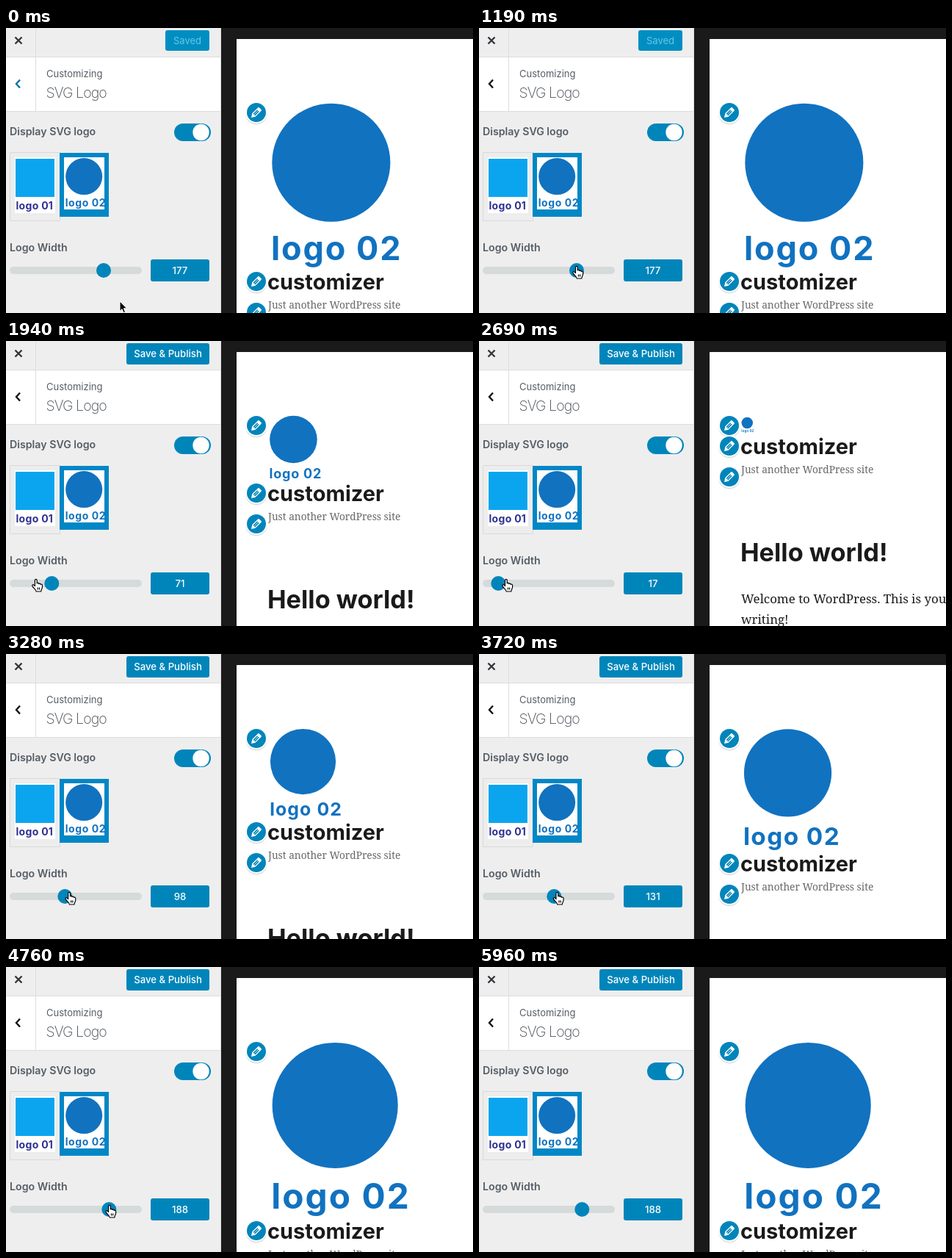
An HTML page for the animation above (7520 ms loop, 636 by 388 pixels).

```html
<!DOCTYPE html>
<html lang="en">
<head>
<meta charset="utf-8">
<title>Logo width customizer</title>
<style>
  html, body { margin: 0; height: 100%; overflow: hidden; background: #eee; }
  svg { display: block; width: 100vw; height: 100vh; font: 13px Inter, sans-serif; }
  .blue { fill: #0085ba; }
  .brand { fill: #1172c0; }
  .bold { font-weight: 700; }
  .label { font-size: 14.2px; font-weight: 600; fill: #555d66; }
  .button { font-size: 13.2px; font-weight: 500; fill: #fff; text-anchor: middle; }
  .serif { font-family: "Noto Serif", serif; }
  .line { fill: none; stroke-width: 2.4; }
</style>
</head>
<body>
<svg viewBox="0 0 636 388">
  <defs>
    <!-- Unit is one hundredth of the logo width -->
    <g id="logo" class="brand">
      <circle cx="48.5" cy="46.5" r="45.5"/>
      <text class="bold" x="2.2" y="121.5" font-size="25.4" letter-spacing="1.1">logo 02</text>
    </g>
    <g id="edit">
      <circle cy="1.5" r="15" fill="#2e4453" opacity=".18"/>
      <circle r="15" fill="#fff"/>
      <circle class="blue" r="13"/>
      <path transform="translate(-10 -10)" fill="#fff" d="M13.89 3.39l2.71 2.72c.46.46.42 1.24.03 1.64l-8.01 8.02-5.56 1.16 1.16-5.58s7.6-7.63 7.99-8.03c.39-.39 1.22-.39 1.68.07zm-2.73 2.79l-5.59 5.61 1.11 1.11 5.54-5.65zm-2.97 8.23l5.58-5.6-1.07-1.08-5.59 5.6z"/>
    </g>
  </defs>

  <!-- Preview -->
  <path fill="#1a1a1a" d="M293 0h343v388H293z"/>
  <path fill="#fff" d="M314 15h322v373H314z"/>
  <use id="pageLogo" href="#logo"/>
  <use href="#edit" x="341" y="115"/>
  <g id="content" fill="#1a1a1a">
    <text class="bold" x="356" y="10.5" font-size="29">customizer</text>
    <text class="serif" x="357" y="37" font-size="13.7" fill="#686868">Just another WordPress site</text>
    <text class="bold" x="356" y="157" font-size="34.3">Hello world!</text>
    <g class="serif" font-size="16.85">
      <text x="357" y="214">Welcome to WordPress. This is your first post.</text>
      <text x="357" y="242">writing!</text>
    </g>
    <use href="#edit" x="341"/>
    <use href="#edit" x="341" y="42"/>
  </g>

  <!-- Sidebar -->
  <path fill="#eee" d="M0 0h293v388H0z"/>
  <path fill="#fff" d="M0 40h292v73H0z"/>
  <path fill="none" stroke="#ddd" d="M0 39.5H292M0 113.5H292M40.5 0V113M292.5 0V388"/>
  <path class="line" stroke="#32373c" d="M12.5 12.5l9 9m0-9l-9 9"/>
  <path id="back" class="line" d="M19 70.5l-5 5.5 5 5.5"/>
  <g id="saved">
    <rect x="217" y="3" width="60" height="28" rx="3" fill="#008ec2"/>
    <text x="247" y="22" text-anchor="middle" fill="#66c6e4">Saved</text>
  </g>
  <g id="publish">
    <rect class="blue" x="164" y="3" width="113" height="29" rx="3"/>
    <text class="button" x="220.5" y="22">Save &amp; Publish</text>
  </g>
  <text x="55" y="67" fill="#555d66">Customizing</text>
  <text x="54.5" y="95" font-size="19.5" font-weight="200" letter-spacing="-.9" fill="#444b52">SVG Logo</text>
  <text class="label" x="5" y="146">Display SVG logo</text>
  <rect class="blue" x="229" y="130" width="50" height="24" rx="12"/>
  <circle cx="265.5" cy="142" r="11.2" fill="#fff"/>

  <path fill="#ededed" stroke="#d9d9d9" d="M5.5 169.5h68v93h-68z"/>
  <path fill="#fff" d="M12 176h55v76H12z"/>
  <path fill="#0ba5ef" d="M13 178h53v52H13z"/>
  <text class="bold" x="13.5" y="247" font-size="14" letter-spacing=".3" fill="#2e3192">logo 01</text>
  <path fill="#0087c6" d="M73 170h67v87H73z"/>
  <path fill="#fff" d="M79 176h55v71H79z"/>
  <use href="#logo" transform="translate(79.5 176.5) scale(.55)"/>

  <text class="label" x="5" y="304">Logo Width</text>
  <rect x="5" y="325" width="180" height="10" rx="5" fill="#d5dadb"/>
  <circle id="knob" class="blue" cy="330" r="10"/>
  <rect class="blue" x="197" y="315" width="80" height="30" rx="3"/>
  <text id="value" class="button" x="237" y="335"></text>

  <path id="arrow" stroke="#fff" d="M0 0v13.5l3-2.8 2.2 5 2.3-1-2.1-4.9h4.1z"/>
  <path id="hand" fill="#fff" stroke="#000" stroke-width="1.2" stroke-linejoin="round" d="M-.5 9V1.8a1.4 1.4 0 0 1 2.8 0V6c.4-1 2.4-.9 2.5.6.5-1 2.4-.6 2.4.8.7-.6 2.4-.2 2.4 1.4V11c0 2-1.6 3-1.8 6H1.2C1 14.5-2 13-4 9.6-4.8 8-3 7.2-2 8.2L-.5 9.7zM3.5 11.5v3m2.2-3v3"/>
</svg>
<script>
const LOOP = 7520;
const STEP = 149; // time between screen updates

const el = id => document.getElementById(id);
const show = (id, on) => el(id).setAttribute('visibility', on ? 'visible' : 'hidden');
const place = (id, x, y, scale = 1) => el(id).setAttribute('transform', `translate(${x} ${y}) scale(${scale})`);

// Smooth progress from 0 to 1 between two times
function ease(t, from, to) {
  const u = Math.min(1, Math.max(0, (t - from) / (to - from)));
  return u * u * (3 - 2 * u);
}

function draw(now) {
  const t = STEP * Math.floor(now % LOOP / STEP + .1);

  // Approach the knob, drag it down, up in two pulls, then leave
  const approach = ease(t, 0, 590);
  const pull = ease(t, 2690, 3590);
  const finish = ease(t, 3590, 4690);
  const leave = ease(t, 5660, 5810);
  const x = 155 - 23 * approach - 96 * ease(t, 1190, 2040) + 68 * pull + 36 * finish + 76 * leave;
  const y = 372 - 48 * approach + 9 * leave;
  const width = Math.round(177 - 160 * ease(t, 1190, 2415) + 112 * pull + 59 * finish);
  const height = Math.max(1.3 * width, 28.4);

  place('pageLogo', 357, 101 + (height - 1.3 * width) * .4, width / 100);
  place('content', 0, Math.round(114.6 + height));
  el('knob').setAttribute('cx', 15 + width * 2 / 3);
  el('value').textContent = width;
  el('back').setAttribute('stroke', t < 1190 ? '#0073aa' : '#111');
  show('saved', width === 177);
  show('publish', width !== 177);

  const onSlider = y < 340 && leave === 0;
  place('arrow', x, y);
  place('hand', x, y);
  show('hand', onSlider);
  show('arrow', !onSlider && t < 5900);
}

function tick() {
  draw(performance.now() - start);
  requestAnimationFrame(tick);
}
const start = performance.now();
tick();
</script>
</body>
</html>
```
